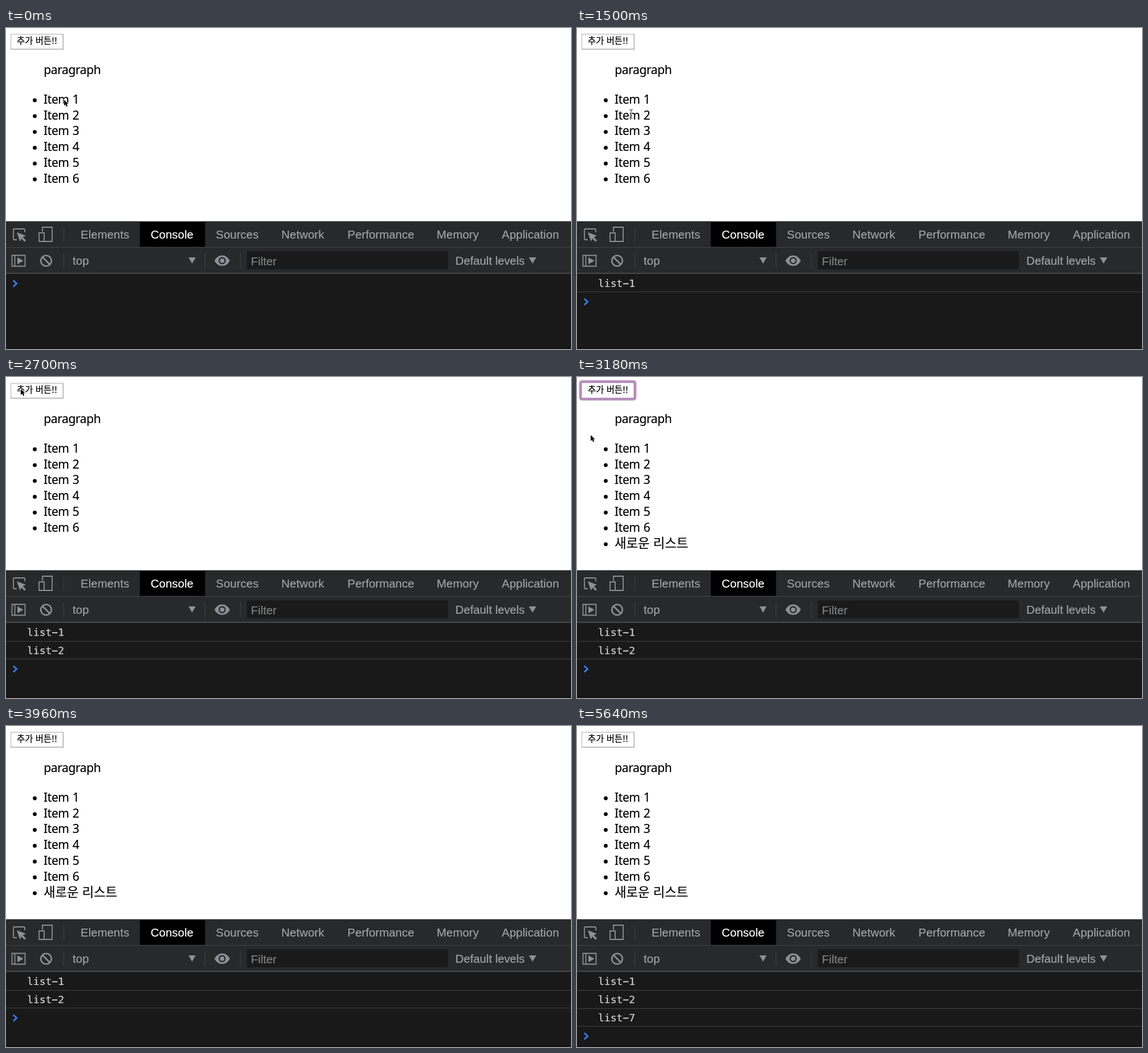
Recreate the animation shown at these times as an HTML page. Size 992 by 564 pixels, loop 6120 ms.

```html
<!DOCTYPE html>
<html lang="ko">
<head>
<meta charset="utf-8">
<title>Event console</title>
<style>
html, body { margin: 0; width: 100%; height: 100%; overflow: hidden; background: #fff; }
svg { display: block; }
text { white-space: pre; fill: currentColor; stroke: currentColor; stroke-width: .2; }
.page { font: 21px "Noto Sans", sans-serif; letter-spacing: -.4px; word-spacing: 1px; }
.ko { font: 22.3px "Noto Sans CJK KR", "Noto Sans CJK", sans-serif; letter-spacing: 0; word-spacing: 0; }
.tool { font: 20.3px "Liberation Sans", Arial, sans-serif; color: #a0a3a6; }
.tab { letter-spacing: .12px; }
.log { font: 18px "DejaVu Sans Mono", monospace; color: #d8d8d8; }
.icon { fill: none; stroke: #8d9094; stroke-width: 1.8; }
.solid { fill: #8d9094; }
</style>
</head>
<body>
<svg width="992" height="564" viewBox="0 0 992 564">
  <g id="button">
    <path d="M8.5 38V11H100" fill="none" stroke="#c6c6c6" stroke-width="1.5"/>
    <path d="M8 37.3H100.3V10.5" fill="none" stroke="#ababab" stroke-width="1.5"/>
  </g>
  <g id="ring" fill="none">
    <rect x="5.5" y="7.5" width="97" height="32" rx="4" stroke="#dcc8df" stroke-width="5"/>
    <rect x="6.5" y="8.5" width="95" height="30" rx="2" stroke="#b287b6" stroke-width="4"/>
  </g>
  <text class="ko" x="19" y="28.3" style="font-size:15.4px">추가 버튼!!</text>
  <g id="list" class="page"><text x="66.3" y="81.3">paragraph</text></g>

  <rect y="339" width="992" height="225" fill="#191919"/>
  <rect y="339" width="992" height="92" fill="#27292a"/>
  <path d="M0 339.5H992" stroke="#8f948f"/>
  <path d="M0 385.5H992" stroke="#424446"/>
  <path d="M0 431H992" stroke="#48494a" stroke-width="2"/>
  <rect y="561" width="992" height="3" fill="#151313"/>
  <rect x="235" y="341" width="114.5" height="43.5"/>
  <rect x="423" y="392.5" width="353" height="31.5" fill="#1a1a1a"/>
  <path d="M101.5 351V376M101.5 396V422M349.5 396V422M411.5 396V422" stroke="#414345"/>

  <g class="icon">
    <path d="M19 372H15Q13 372 13 370V355Q13 353 15 353H31Q33 353 33 355V359"/>
    <path d="M64 358V350H81V375H68M58 360H67V375H58Z"/>
    <path d="M10.5 399.5H33.5V418.5H10.5ZM15.5 399V419"/>
    <circle cx="70.5" cy="409" r="9.3" stroke-width="2.6"/>
    <path d="M64 402.5L77 415.5" stroke-width="2.6"/>
  </g>
  <g class="solid">
    <path d="M19 359L35 365L29.5 367.5L35 373L32.5 375.5L27 370L24.5 375Z"/>
    <path d="M20 403L30.5 409L20 415Z"/>
    <path d="M320.5 403H333L326.7 414ZM918 403H931L924.5 414Z"/>
    <path d="M366 409Q371 399.5 379.5 399.5T393 409Q388 418 379.5 418T366 409Z"/>
    <circle cx="379.5" cy="408.8" r="6.3" fill="#27292a"/>
    <circle cx="379.5" cy="408.8" r="3.9"/>
  </g>
  <g id="tools" class="tool"></g>
  <g id="console"></g>
  <path id="prompt" d="M12.7 443.5L18.7 449L12.7 454.5" fill="none" stroke="#3a80f0" stroke-width="2.6"/>

  <g id="arrow">
    <path d="M0 0V10.5L2.4 8.2L4.2 12.2L6.1 11.3L4.5 7.5H7.5Z" stroke="#fff" stroke-width="1.6" paint-order="stroke"/>
  </g>
  <g id="beam" fill="none">
    <path d="M-3 -8Q0 -8 0 -5.5Q0 -8 3 -8M0 -6V6M-3 8Q0 8 0 5.5Q0 8 3 8M-2 3H2" stroke="#fff" stroke-width="2.4"/>
    <path d="M-3 -8Q0 -8 0 -5.5Q0 -8 3 -8M0 -6V6M-3 8Q0 8 0 5.5Q0 8 3 8M-2 3H2" stroke="#333" stroke-width="1"/>
  </g>
</svg>
<script>
const LOOP = 6120, STEP = 60;
const $ = id => document.getElementById(id);
const show = (el, on) => el.setAttribute('visibility', on ? 'visible' : 'hidden');
const place = (el, x, y) => el.setAttribute('transform', `translate(${x} ${y})`);

function add(parent, tag, attrs, text = '') {
  const el = document.createElementNS('http://www.w3.org/2000/svg', tag);
  for (const key in attrs) el.setAttribute(key, attrs[key]);
  el.textContent = text;
  return parent.appendChild(el);
}

const items = Array.from({ length: 7 }, (_, i) => {
  const y = 27.8 * i, isNew = i === 6;
  const row = add($('list'), 'g', {});
  add(row, 'circle', { cx: 50.5, cy: 127 + y, r: 3.4 });
  add(row, 'text', { x: 66, y: 132.8 + y, class: isNew ? 'ko' : 'page' },
    isNew ? '새로운 리스트' : `Item ${i + 1}`);
  return row;
});

const labels = [
  ['Elements', 131], ['Console', 254, '#fff'], ['Sources', 368.5], ['Network', 483.5],
  ['Performance', 599.5], ['Memory', 756.3], ['Application', 870.5]
];
for (const [name, x, color = '#a0a3a6'] of labels)
  add($('tools'), 'text', { x, y: 370, class: 'tab', style: `color:${color}` }, name);
add($('tools'), 'text', { x: 117, y: 415.5, class: 'tab' }, 'top');
add($('tools'), 'text', { x: 430, y: 416.5, style: 'color:#7f8183' }, 'Filter');
add($('tools'), 'text', { x: 789, y: 415.5 }, 'Default levels');

// The minus sign gives the wide dash of the console font.
const logs = [['list−1', 780], ['list−2', 1740], ['list−7', 4440]].map(([text, time], i) => {
  const row = add($('console'), 'g', {});
  add(row, 'text', { x: 37, y: 455 + 32 * i, class: 'log' }, text);
  const line = add(row, 'path', { d: 'M0 .5H992', stroke: '#424242' });
  return { row, line, time };
});

// Pointer stops: time, x, y
const stops = [
  [0, 102, 126], [60, 102, 126], [300, 95, 132], [1200, 95, 132], [1440, 95, 151],
  [2040, 95, 151], [2220, 30, 133], [2700, 26, 21], [3000, 26, 21], [3180, 24, 102],
  [3660, 98, 293], [5280, 98, 293], [5640, 115, 570], [LOOP, 115, 570]
];

function pointerAt(t) {
  const i = stops.findIndex(s => s[0] > t);
  const [t0, x0, y0] = stops[i - 1], [t1, x1, y1] = stops[i];
  const k = (t - t0) / (t1 - t0);
  return [x0 + (x1 - x0) * k, y0 + (y1 - y0) * k];
}

function draw(now) {
  const t = Math.floor(now % LOOP / STEP) * STEP;
  const count = logs.filter(log => t >= log.time).length;
  logs.forEach(({ row, line }, i) => {
    show(row, i < count);
    place(line, 0, 464 + 32 * i - (i === count - 1));
  });
  place($('prompt'), 0, 32 * count);
  show(items[6], t >= 2820);
  const focused = t >= 2760 && t < 3780;
  show($('ring'), focused);
  show($('button'), !focused);

  const [x, y] = pointerAt(t);
  const overText = t > 60 && x > 66 && y > 111 && y < 306;
  place($('arrow'), x, y);
  place($('beam'), x, y);
  show($('arrow'), !overText);
  show($('beam'), overText);
}

const start = performance.now();
function tick() {
  draw(performance.now() - start);
  requestAnimationFrame(tick);
}
tick();
</script>
</body>
</html>
```
